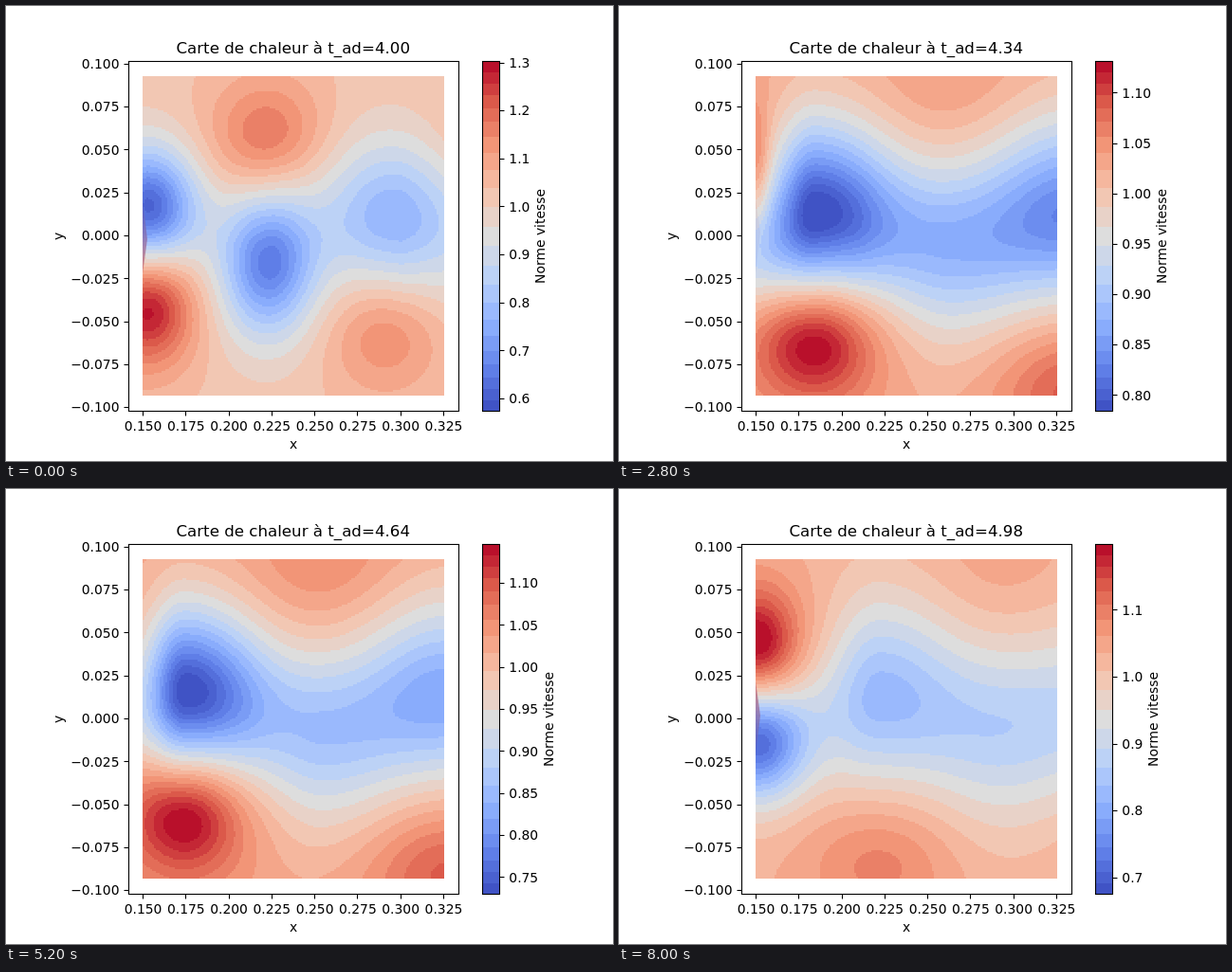
An HTML page with a canvas that plays this animation: 640 px wide and 480 px high, repeating every 8200 ms.

```html
<!DOCTYPE html>
<html lang="fr">
<head>
<meta charset="utf-8">
<title>Carte de chaleur</title>
<style>
html, body { margin: 0; width: 100%; height: 100%; overflow: hidden; background: #fff; }
canvas { display: block; }
</style>
</head>
<body>
<canvas id="stage" width="640" height="480"></canvas>
<script>
const ctx = document.getElementById('stage').getContext('2d');
const FRAMES = 41, STEP = 200, DT = 0.02457, PERIOD = 0.152;
const W = 159, H = 169, CELL = 2, LEFT = 144, TOP = 74, SCALE = 1811;
const field = document.createElement('canvas');
field.width = W;
field.height = H;
const fctx = field.getContext('2d');
const pixels = fctx.createImageData(W, H);

const clamp = v => Math.max(0, Math.min(1, v));
const mix = (a, b, u) => a + (b - a) * u;
const bell = (d, s) => Math.exp(-d * d / (s * s));
const px = x => LEFT + 0.5 + (x - 0.15) * SCALE;
const py = y => 242.5 - y * SCALE;
const phaseAt = k => k * DT / PERIOD;

// Cool-to-warm palette in bands that widen towards the middle.
const STOPS = [[59, 76, 192], [98, 130, 234], [141, 176, 254], [184, 208, 249],
  [221, 221, 221], [245, 196, 173], [244, 154, 123], [222, 96, 77], [180, 4, 38]];
const BAND_COUNT = 23;
const edge = i => i / BAND_COUNT - 0.045 * Math.sin(2 * Math.PI * i / BAND_COUNT);
function ramp(t) {
  const i = Math.min(7, Math.floor(t * 8));
  return STOPS[i].map((v, j) => Math.round(mix(v, STOPS[i + 1][j], t * 8 - i)));
}
const bands = Array.from({ length: BAND_COUNT }, (_, i) => ramp((edge(i) + edge(i + 1)) / 2));
const bandAt = Array.from({ length: 1001 }, (_, i) =>
  bands.find((_, b) => i / 1000 <= edge(b + 1) + 1e-9));

// The extremes pulse twice per shedding period; the fast one decays, then rises again.
function range(k) {
  const phase = phaseAt(k), half = 2 * phase % 1;
  const lo = 0.71 - 0.09 * Math.cos(4 * Math.PI * phase - 0.75) - 0.07 * Math.exp(-k / 3);
  const swing = 0.2 * (1 - (k / 46) ** 6);
  const hi = 1.103 + swing * Math.max(Math.exp(-half / 0.27), (half - 0.58) / 0.42);
  return [lo, hi];
}

function wakeDepth(x, k) {
  const early = Math.exp(-k / 3) * clamp((0.3 - x) / 0.08);
  return 0.11 * (0.7 + 0.3 * clamp((x - 0.15) / 0.06)) * (1 - early);
}
const base = (x, y, k) => 1.028 - wakeDepth(x, k) * bell(y, 0.045);

// Each vortex pairs a fast lobe with a slow one; both widen and drift with age.
function vortex(age, side, k, lo, hi) {
  const d = Math.max(0, age - 0.45), grown = clamp(d / 0.55), open = clamp(2 * grown);
  const born = clamp((age - 0.25) / 0.2) ** 2, young = clamp((0.95 - age) / 0.2);
  const pulse = Math.cos(2 * Math.PI * (age - 1) / 0.7);
  const x = 0.15 + 0.14 * d * clamp(0.3 + 1.5 * d);
  const fy = 0.037 + 0.052 * grown ** 1.5, sy = -0.012 - 0.019 * grown;
  return {
    age, side, x, fy, sy,
    fw: 0.008 + 0.018 * born + 0.02 * grown,
    fh: 0.038,
    sl: 0.022 + 0.03 * Math.max(0, age - 0.8),
    sr: 0.026 + 0.02 * open,
    sh: 0.034 + 0.018 * open,
    fast: mix(0.04 + 0.03 * pulse, 1.1 * (hi - base(x, fy, k)), young) * clamp((age - 0.22) / 0.1),
    slow: mix(0.075 + 0.04 * pulse, base(x, sy, k) - lo, young) * clamp((age - 0.2) / 0.2)
  };
}

// Those already downstream at the start are stronger and closer to the axis.
function strongVortex(age, side) {
  const old = age - 1, s = 0.028 + 0.024 * old;
  return {
    age, side, x: 0.222 + 0.138 * old, fy: 0.056, sy: -0.016,
    fw: 0.034, fh: 0.036, sl: s, sr: s, sh: 0.044,
    fast: 0.165 - 0.07 * old,
    slow: Math.max(0, 0.37 - 0.4 * old)
  };
}

// Vortices leave alternately from both sides, every half period.
function vortices(k, lo, hi) {
  const list = [];
  for (let n = -2; n < 16; n++) {
    const age = 1 + phaseAt(k) - n / 2, side = n % 2 ? -1 : 1;
    if (age < 0.2 || age > 2.2) continue;
    list.push(n > 0 ? vortex(age, side, k, lo, hi) : strongVortex(age, side));
  }
  return list;
}

function drawField(k, lo, hi) {
  const list = vortices(k, lo, hi);
  for (let i = 0; i < W; i++) {
    const x = 0.15 + i * CELL / SCALE;
    const lobes = list.map(v => [
      v.fast * bell(x - v.x, v.fw),
      v.slow * bell(x - v.x, x < v.x ? v.sl : v.sr)
    ]);
    for (let j = 0; j < H; j++) {
      const y = (242.5 - TOP - 1 - j * CELL) / SCALE;
      let speed = base(x, y, k);
      list.forEach((v, m) => {
        speed += lobes[m][0] * bell(v.side * y - v.fy, v.fh)
               - lobes[m][1] * bell(v.side * y - v.sy, v.sh);
      });
      const c = bandAt[Math.round(1000 * clamp((speed - lo) / (hi - lo)))];
      pixels.data.set([...c, 255], 4 * (j * W + i));
    }
  }
  fctx.putImageData(pixels, 0, 0);
  ctx.imageSmoothingEnabled = false;
  ctx.drawImage(field, LEFT, TOP, W * CELL, H * CELL - 1);
  list.filter(v => v.age < 0.65).forEach(drawSliver);
}

// Thin mixed strip where the two shear layers meet at the inlet.
function drawSliver({ age, side }) {
  const y = v => py(side * v);
  const grad = ctx.createLinearGradient(0, y(0.022), 0, y(-0.02));
  grad.addColorStop(0, '#cf6464');
  grad.addColorStop(0.5, '#8a6aa6');
  grad.addColorStop(1, '#4c62cf');
  ctx.globalAlpha = 0.75 * clamp((age - 0.25) / 0.1) * clamp((0.65 - age) / 0.08);
  ctx.fillStyle = grad;
  ctx.beginPath();
  ctx.moveTo(LEFT, y(0.022));
  ctx.lineTo(LEFT + 5, y(0.002));
  ctx.lineTo(LEFT, y(-0.022));
  ctx.fill();
  ctx.globalAlpha = 1;
}

function text(s, x, y, align = 'center', size = 13.89) {
  ctx.font = size + 'px "DejaVu Sans", sans-serif';
  ctx.textAlign = align;
  ctx.fillStyle = '#000';
  ctx.fillText(s, x, y);
}
function sideText(s, x, y) {
  ctx.save();
  ctx.translate(x, y);
  ctx.rotate(-Math.PI / 2);
  text(s, 0, 0);
  ctx.restore();
}
function tick(x, y, dx, dy) {
  ctx.beginPath();
  ctx.moveTo(x, y);
  ctx.lineTo(x + dx, y + dy);
  ctx.stroke();
}
const snap = v => Math.floor(v) + 0.5;

function drawAxes(k) {
  ctx.strokeStyle = '#000';
  ctx.lineWidth = 1.1;
  ctx.strokeRect(129.5, 58.5, 348, 369);
  for (let i = 0; i < 8; i++) {
    const x = 0.15 + i * 0.025;
    tick(snap(px(x)), 428, 0, 4.5);
    text(x.toFixed(3), px(x), 448);
  }
  for (let i = -4; i <= 4; i++) {
    const y = py(i * 0.025);
    tick(129, snap(y), -4.5, 0);
    text((i < 0 ? '\u2212' : '') + Math.abs(i * 0.025).toFixed(3), 119.5, y + 4.8, 'right');
  }
  text('x', 303, 467);
  sideText('y', 59.5, 243);
  text('Carte de chaleur à t_ad=' + (4 + k * DT).toFixed(2), 302.7, 50, 'center', 16.67);
}

function drawBar(lo, hi) {
  const y = t => 427.5 - 369 * t;
  bands.forEach((c, i) => {
    const top = Math.round(y(edge(i + 1)));
    ctx.fillStyle = `rgb(${c})`;
    ctx.fillRect(502, top, 18.5, Math.round(y(edge(i))) - top);
  });
  ctx.strokeRect(502.5, 58.5, 18, 369);
  const fine = hi - lo < 0.45, step = fine ? 0.05 : 0.1;
  for (let i = Math.ceil(lo / step); i * step <= hi; i++) {
    const at = y((i * step - lo) / (hi - lo));
    tick(521, snap(at), 4.5, 0);
    text((i * step).toFixed(fine ? 2 : 1), 530.3, at + 4.8, 'left');
  }
  sideText('Norme vitesse', fine ? 576.5 : 567.5, 243);
}

let shown = -1;
function render(now) {
  const k = Math.floor(now / STEP) % FRAMES;
  if (k !== shown) {
    shown = k;
    const [lo, hi] = range(k);
    ctx.fillStyle = '#fff';
    ctx.fillRect(0, 0, 640, 480);
    drawField(k, lo, hi);
    drawAxes(k);
    drawBar(lo, hi);
  }
  requestAnimationFrame(render);
}
render(0);
</script>
</body>
</html>
```
